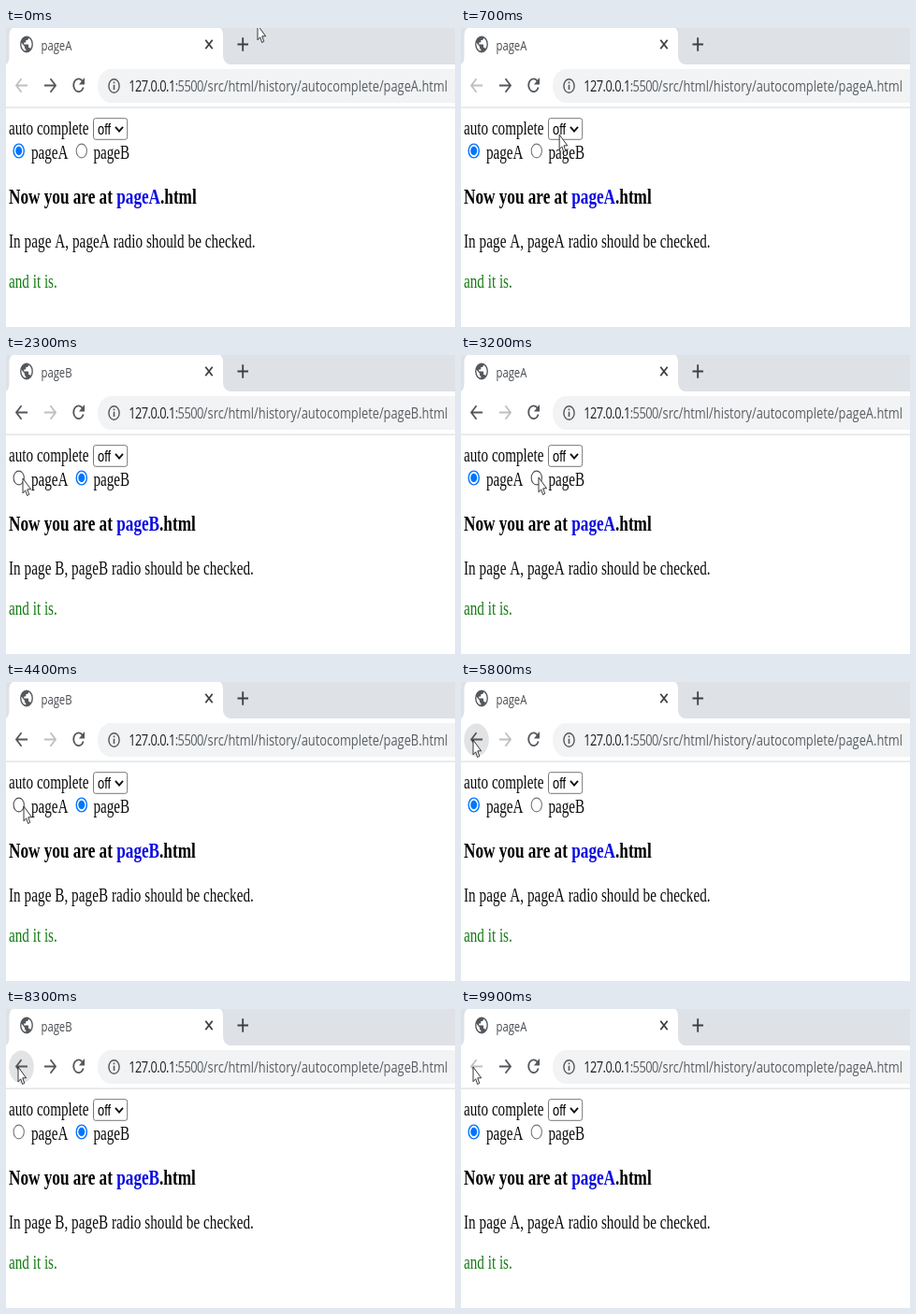
These frames come from a looping animation (480 px wide and 320 px high, 10 s). An HTML page:

```html
<!DOCTYPE html>
<html lang="en">
<head>
<meta charset="utf-8">
<title>History and autocomplete</title>
<style>
  html, body { margin: 0; width: 100%; height: 100%; overflow: hidden; background: #fff; }
  svg { display: block; width: 480px; height: 320px; }
  .ui { font: 17.05px "Open Sans", "Noto Sans", sans-serif; fill: #5a5e63; }
  .tab { font-size: 15px; fill: #484c50; }
  .num { letter-spacing: -.7px; }
  .host { fill: #202124; }
  .page { font: 20.1px "Liberation Serif", "Times New Roman", serif; fill: #0c0c0c; }
  .wide { letter-spacing: .075px; }
  .head { font-size: 22.8px; font-weight: bold; fill: #000; }
  .field { font: 17px "Liberation Sans", Arial, sans-serif; fill: #000; }
  .icon { fill: none; stroke: #54575b; stroke-width: 1.8; }
  .dark { stroke: #3c4043; }
  .off { stroke: #bdbfc2; }
  .ring { fill: #fff; stroke: #767676; stroke-width: 1.1; }
  .dot { fill: #0075ff; visibility: hidden; }
  .hover .ring { stroke: #4f4f4f; }
  .checked .ring { stroke: #0075ff; stroke-width: 1.4; }
  .checked .dot { visibility: visible; }
  .checked.hover .ring { stroke: #005cc8; }
  .checked.hover .dot { fill: #005cc8; }
</style>
</head>
<body>
<svg viewBox="0 0 480 320">
  <defs>
    <linearGradient id="fade">
      <stop offset="0" stop-color="#fff" stop-opacity="0"/>
      <stop offset="1" stop-color="#fff"/>
    </linearGradient>
  </defs>

  <!-- browser frame -->
  <rect width="480" height="39" fill="#dee1e6"/>
  <path d="M0 39Q3.5 37 3.5 29V8Q3.5 2 7 0H229Q232 2 232 8V29Q232 37 239 39Z" fill="#fff"/>
  <rect y="39" width="480" height="45.5" fill="#fff"/>
  <rect y="84.5" width="480" height="1.2" fill="#dcdee1"/>
  <rect x="98" y="44" width="420" height="36" rx="14" ry="18" fill="#f1f3f4"/>

  <g id="globe" transform="translate(22 17.4) scale(.69 .9)">
    <circle r="10" fill="#54585d"/>
    <path d="M-1 7.9C-5 7.4-8 4.1-8 0Q-8-.9-7.8-1.8L-3 3V4Q-3 6-1 6ZM5.9 5.4Q5.4 4 4 4H3V1Q3 0 2 0H-4V-2H-2Q-1-2-1-3V-5H1Q3-5 3-7V-7.4C6-6.2 8-3.3 8 0Q8 3.1 5.9 5.4Z" fill="#fff"/>
  </g>
  <path class="icon dark" d="M213.3 12.8L220.7 22.2M220.7 12.8L213.3 22.2"/>
  <path class="icon dark" d="M247.5 17.5H259M253.2 10.3V24.7"/>

  <ellipse id="halo" cx="16.5" cy="62" rx="13.3" ry="17.6" fill="#e2e3e5"/>
  <path id="back" class="icon" d="M23 61.5H11M16.5 54.3L11 61.5L16.5 68.7"/>
  <path id="forward" class="icon" d="M41 61.5H53M47.5 54.3L53 61.5L47.5 68.7"/>
  <g id="reload">
    <path class="icon" d="M82 57.2A5.4 6.9 0 1 0 82.7 63.5"/>
    <path d="M84 53V60.5H78Z" fill="#54575b"/>
  </g>
  <path id="stop" class="icon" d="M72 54.8L83 68.2M83 54.8L72 68.2"/>
  <g class="icon">
    <ellipse cx="115.5" cy="62" rx="5.6" ry="7.3" stroke-width="1.4"/>
    <path d="M115.5 60.8V66M115.5 57.5V59.2" stroke-width="1.6"/>
  </g>

  <!-- form controls -->
  <rect x="93.5" y="96.7" width="36.2" height="22.6" rx="2" ry="3" fill="#fff" stroke="#767676"/>
  <path d="M117 105.8L121 110.5L125 105.8" fill="none" stroke="#111" stroke-width="1.9"/>
  <g id="radioA">
    <ellipse class="ring" cx="13.7" cy="131.5" rx="5.6" ry="7.4"/>
    <ellipse class="dot" cx="13.7" cy="131.5" rx="3.5" ry="4.7"/>
  </g>
  <g id="radioB">
    <ellipse class="ring" cx="80.8" cy="131.5" rx="5.6" ry="7.4"/>
    <ellipse class="dot" cx="80.8" cy="131.5" rx="3.5" ry="4.7"/>
  </g>

  <!-- the screen is squeezed sideways, so all its text shares one scale -->
  <g transform="scale(.754 1)">
    <text id="name" class="ui tab" x="49.7" y="24">page<tspan class="letter">A</tspan></text>
    <text id="address" class="ui tab" x="50" y="24"><tspan class="num">127.0.0.1:5500</tspan>/src/html/history/a</text>
    <text class="ui num" x="174" y="68.5"><tspan class="host">127.0.0.1</tspan>:5500</text>
    <text class="ui" x="279.6" y="68.5">/src/html/history/autocomplete/page<tspan class="letter">A</tspan>.html</text>
    <text class="page" x="4" y="113.8">auto complete</text>
    <text id="choice" class="field" x="130" y="114">off</text>
    <text class="page" x="35.8" y="140">pageA</text>
    <text class="page" x="124" y="140">pageB</text>
    <text class="page head" x="4" y="188">Now you are at <tspan fill="#0a0ae0">page<tspan class="letter">A</tspan></tspan>.html</text>
    <text class="page wide" x="4" y="235">In page <tspan class="letter">A</tspan>, page<tspan class="letter">A</tspan> radio should be checked.</text>
    <text id="result" class="page" x="4" y="278.3" style="fill:#137a13">and it is.</text>
  </g>
  <rect id="veil" x="188" y="6" width="18" height="24" fill="url(#fade)"/>

  <path id="cursor" d="M0 0V15.8L2.7 12.8L4.6 18.5L6.7 17.4L4.8 11.8H8.6Z" fill="#fff" stroke="#222" stroke-width=".9"/>
</svg>
<script>
  const LOOP = 10000, STEP = 100;
  const $ = id => document.getElementById(id);
  const letters = document.querySelectorAll('.letter');

  // start, page, place in history, loading time, whether the tab shows the address
  const visits = [
    [0, 'A', 0, 0, false],
    [1200, 'B', 1, 300, true],
    [2500, 'A', 2, 100, false],
    [3500, 'B', 3, 100, false],
    [4600, 'A', 4, 200, true],
    [6000, 'B', 3, 200, true],
    [7000, 'A', 2, 200, true],
    [8000, 'B', 1, 100, false],
    [9200, 'A', 0, 100, false]
  ];
  const LAST_CLICK = 4; // later visits use the back button

  // time, x, y
  const path = [
    [0, 269, -3], [900, 81.5, 131], [1700, 81.5, 131], [2300, 18, 132],
    [2700, 18, 132], [3100, 83, 131], [3800, 83, 131], [4300, 19, 133],
    [4900, 19, 133], [5600, 13, 62], [LOOP, 13, 62]
  ];

  function cursorAt(t) {
    const i = path.findIndex(p => p[0] > t);
    const [t0, x0, y0] = path[i - 1], [t1, x1, y1] = path[i];
    const k = (t - t0) / (t1 - t0), e = k * k * (3 - 2 * k);
    return [x0 + (x1 - x0) * e, y0 + (y1 - y0) * e];
  }

  const show = (id, on) => { $(id).style.visibility = on ? 'visible' : 'hidden'; };

  function draw(t) {
    const i = visits.findLastIndex(v => v[0] <= t);
    const [start, page, depth, wait, urlTitle] = visits[i];
    const loading = t < start + wait;
    const rawTitle = loading && urlTitle;
    const next = visits[i + 1];
    const clicked = next && i < LAST_CLICK && t >= next[0] - STEP;
    const picked = clicked ? next[1] : page;
    const [x, y] = cursorAt(t);
    const near = (cx, cy, rx, ry) => Math.hypot((x - cx) / rx, (y - cy) / ry) < 1;

    letters.forEach(el => { el.textContent = page; });
    $('choice').textContent = loading ? 'on' : 'off';
    show('name', !rawTitle);
    show('globe', !rawTitle);
    show('address', rawTitle);
    show('veil', rawTitle);
    show('reload', !loading);
    show('stop', loading);
    show('result', !loading);

    $('back').classList.toggle('off', depth === 0);
    $('forward').classList.toggle('off', i > 0 && i <= LAST_CLICK);
    show('halo', depth > 0 && near(16.5, 62, 13.3, 17.6));

    for (const [name, cx] of [['A', 13.7], ['B', 80.8]]) {
      const list = $('radio' + name).classList;
      list.toggle('checked', picked === name);
      list.toggle('hover', near(cx, 131.5, 6.2, 8));
    }
    $('cursor').setAttribute('transform', `translate(${x} ${y})`);
  }

  const origin = performance.now();
  function tick() {
    const t = (performance.now() - origin) % LOOP;
    draw(Math.floor(t / STEP) * STEP);
    requestAnimationFrame(tick);
  }
  tick();
</script>
</body>
</html>
```
